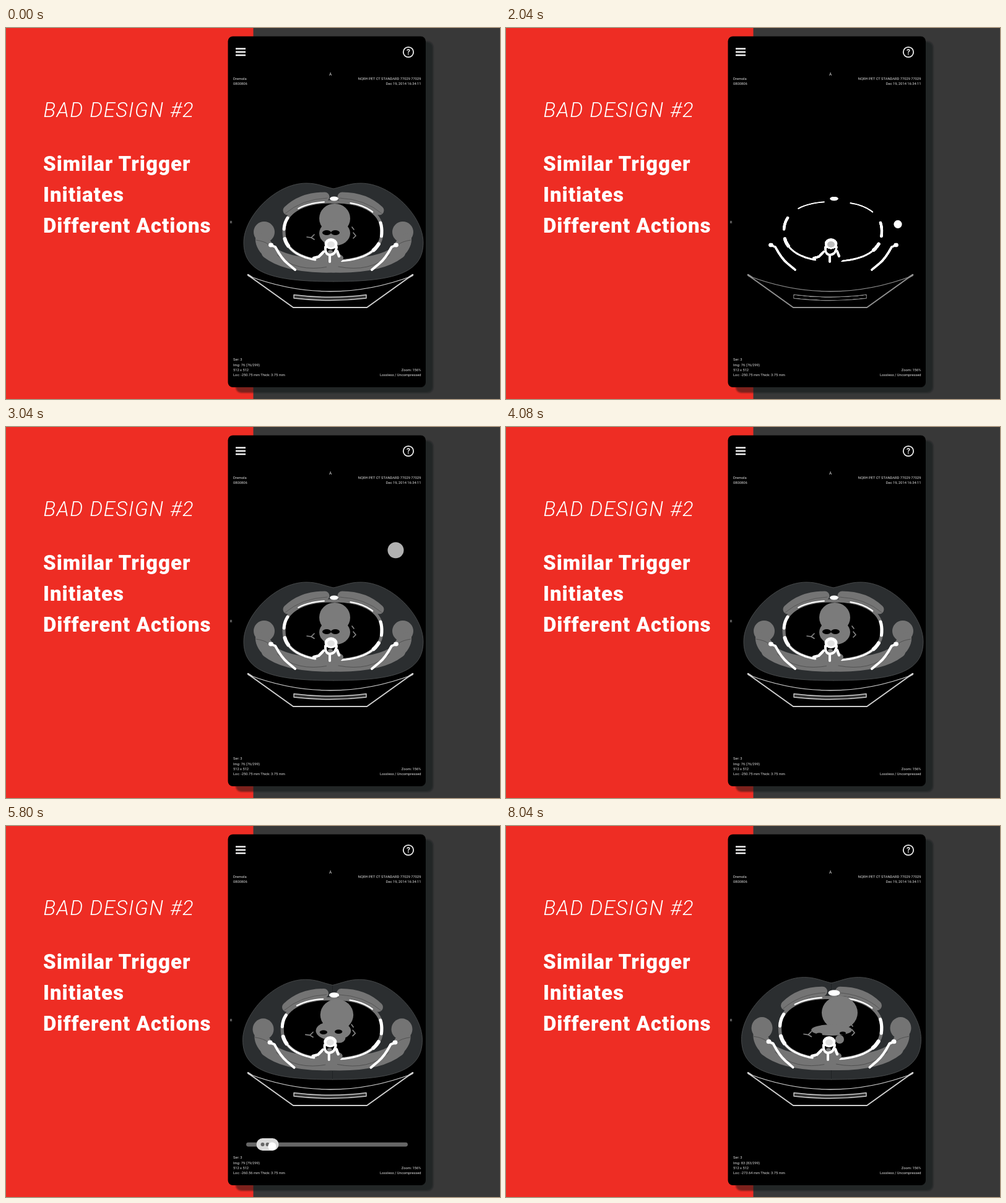
Recreate the animation shown at these times as an HTML page. Size 798 px wide and 600 px high, loop 8.08 s.

```html
<!DOCTYPE html>
<html lang="en">
<head>
<meta charset="utf-8">
<title>Bad design #2</title>
<style>
html, body { margin: 0; width: 100%; height: 100%; overflow: hidden; background: #383838; }
svg { display: block; width: 798px; height: 600px; font-family: Roboto, Arial, sans-serif; }
.title { font-size: 33px; fill: #fff; }
.light { font-weight: 300; font-style: italic; letter-spacing: 1.5px; }
.bold { font-weight: 800; letter-spacing: 1px; }
.info { font-size: 5.75px; fill: #e0e0e0; }
.end { text-anchor: end; }
.line { fill: none; stroke-linecap: round; stroke-linejoin: round; }
</style>
</head>
<body>
<svg viewBox="0 0 798 600" xmlns="http://www.w3.org/2000/svg">
  <defs>
    <filter id="soft" x="-5%" y="-5%" width="110%" height="110%"><feGaussianBlur stdDeviation="1"/></filter>
    <filter id="window" filterUnits="userSpaceOnUse" x="360" y="230" width="318" height="240" color-interpolation-filters="sRGB">
      <feComponentTransfer>
        <feFuncR type="linear"/><feFuncG type="linear"/><feFuncB type="linear"/>
      </feComponentTransfer>
    </filter>
  </defs>

  <rect width="798" height="600" fill="#383838"/>
  <rect width="399.5" height="600" fill="#ee2d24"/>
  <g class="title">
    <text class="light" x="60.6" y="144">BAD DESIGN #2</text>
    <g class="bold">
      <text x="60" y="231">Similar Trigger</text>
      <text x="60" y="281">Initiates</text>
      <text x="60" y="331">Different Actions</text>
    </g>
  </g>

  <rect x="371" y="22" width="319" height="568" rx="9" fill="#0c1218" opacity=".5" filter="url(#soft)"/>
  <rect x="358.5" y="13.5" width="319.5" height="567.5" rx="8"/>
  <path d="M371 33.5h16M371 38.7h16M371 44h16" stroke="#f4f4f4" stroke-width="2.6"/>
  <circle cx="650" cy="39" r="8.2" fill="none" stroke="#ececec" stroke-width="1.8"/>
  <text x="650" y="43.4" text-anchor="middle" font-size="12" font-weight="700" fill="#ececec">?</text>

  <g class="info">
    <text x="367" y="84">Dremola</text>
    <text x="367" y="92">0800806</text>
    <text x="522" y="77.3" font-size="6.5">A</text>
    <text x="362" y="316" font-size="5">R</text>
    <text class="end" x="670.5" y="84">NQRH PET CT STANDARD 77029 77029</text>
    <text class="end" x="670.5" y="92">Dec 19, 2014 16:34:11</text>
    <text x="367" y="538">Ser: 3</text>
    <text x="367" y="546.5" id="image"></text>
    <text x="367" y="554.5">512 x 512</text>
    <text x="367" y="562.5" id="location"></text>
    <text class="end" x="670.5" y="554.5">Zoom: 156%</text>
    <text class="end" x="670.5" y="562.5">Lossless / Uncompressed</text>
  </g>

  <g filter="url(#window)">
    <g id="body"></g>
    <g id="chest"></g>
    <g id="heart"></g>
    <g id="spine"></g>
    <g class="line" stroke="#cfcfcf">
      <path d="M391 400l6 4 67 48h119l67-48 7-4" stroke-width="2"/>
      <path d="M392 401Q524 451 656 401" stroke-width="1.3"/>
      <path d="M391 399l6 4M657 399l-6 4" stroke-width="2.6"/>
      <path d="M465 431.5Q524 439 582 431.5V437Q524 444 465 437Z" stroke-width="1.4" fill="#333"/>
    </g>
  </g>

  <g id="slider">
    <rect x="388" y="511.7" width="261" height="6.8" rx="3.4" fill="#666"/>
    <g id="thumb">
      <rect x="-18" y="505" width="36" height="20" rx="10" fill="#dadada"/>
      <g fill="#666"><circle cx="-8" cy="515" r="3"/><circle cy="515" r="3"/><circle cx="8" cy="515" r="3"/></g>
    </g>
  </g>
  <circle id="touch" fill="#fff"/>
</svg>

<script>
const LOOP = 8080;
const FIRST = 76, LAST = 83, SPACING = 3.27;
const BONE = '#fff', MUSCLE = '#747474', HEART = '#7b7b7b', AIR = '#000';
const AXIS = 529;

const $ = id => document.getElementById(id);
const clamp = v => Math.min(1, Math.max(0, v));
const mix = (a, b, p) => a + (b - a) * p;
const ramp = (t, a, b) => clamp((t - a) / (b - a));
const ease = p => (1 - Math.cos(Math.PI * p)) / 2;

const line = (d, color, width) => `<path class="line" d="${d}" stroke="${color}" stroke-width="${width}"/>`;
const oval = (x, y, rx, ry, color, turn = 0) =>
  `<ellipse rx="${rx}" ry="${ry}" fill="${color}" transform="translate(${x} ${y}) rotate(${turn})"/>`;
const both = half => half + `<g transform="translate(${2 * AXIS}) scale(-1 1)">${half}</g>`;

// Point on the rounded rib cage, angle in degrees clockwise from the right
function cagePoint(angle) {
  const a = angle * Math.PI / 180;
  const bulge = v => Math.sign(v) * Math.abs(v) ** .87;
  return [528 + 79 * bulge(Math.cos(a)), 329 + 48 * bulge(Math.sin(a))].map(v => v.toFixed(1));
}
function cageArc(from, to) {
  const steps = Math.ceil(Math.abs(to - from) / 5);
  return 'M' + Array.from({ length: steps + 1 }, (_, i) => cagePoint(mix(from, to, i / steps))).join('L');
}

const skin = 'M529 260C512 256 503 251 485 251C435 251 384 305 384 347C384 396 430 410 529 410Z';
$('body').innerHTML =
  both(`<path d="${skin}" fill="#2b2e30"/>` + line(skin.replace('Z', ''), '#4b4d4e', .9)) +
  both(
    line('M455 295Q478 273 515 273', MUSCLE, 15) +
    oval(417, 330, 17, 17, MUSCLE) +
    oval(418, 352, 12, 22, MUSCLE, -30) +
    line('M424 362Q455 386 529 384', MUSCLE, 23) +
    line('M404 343Q418 345 424 350M438 367Q470 396 521 386', '#4e4e4e', .9) +
    line('M451 300Q478 277 519 275', '#4e4e4e', .8) +
    line('M427 351L435 354Q445 373 455 381L467 391', BONE, 4) +
    oval(428, 351, 4, 3.4, BONE)
  );

const cage = cageArc(0, 360);
const ribs = [[183, 204, 5], [154, 168, 6], [108, 150, 3.2], [228, 262, 2.2]];
const TILT = 10;
$('chest').innerHTML =
  `<path d="${cage}" fill="${AIR}" stroke="${MUSCLE}" stroke-width="5"/>` +
  line('M486 338l7 1 5 -5M493 339l5 3M559 322l3 4M561 331l4 5 -4 4', '#888', 1.6) +
  ribs.map(([from, to, width]) =>
    line(cageArc(from, to), BONE, width) + line(cageArc(180 - from + TILT, 180 - to + TILT), BONE, width)
  ).join('');

$('spine').innerHTML =
  oval(525, 372, 20, 9, MUSCLE) +
  line('M516 354Q515 366 523 367Q533 366 534 354', BONE, 4) +
  line('M513 362L505 370L497 372M535 361L538 369', BONE, 4.5) +
  line('M523 367V378', BONE, 4) +
  oval(525, 349, 10.5, 9, BONE) + oval(525, 350, 6, 5, '#e2e2e2') +
  oval(524, 361.5, 4, 2.5, '#777');

function set(node, attributes) {
  for (const name in attributes) node.setAttribute(name, attributes[name]);
}

// p runs from the first shown slice (0) to the last (1)
function drawSlice(p) {
  const grow = 1 + .04 * p;
  set($('body'), { transform: `translate(${-3.5 * p} ${-16.4 * p}) scale(1 ${grow})` });
  set($('chest'), { transform: `translate(${-24.5 * p} ${-15 * p}) scale(${grow})` });
  set($('spine'), { transform: `translate(${-3 * p})` });
  const between = (a, b) => mix(a, b, p);
  const airway = (a, b) => oval(between(525 + 7 * a, 525 + 19 * a), between(331, b), between(7, 5), between(4, 2.5), AIR);
  $('heart').innerHTML =
    oval(between(531, 539), between(308, 302), between(25, 29), between(24, 27), HEART) +
    oval(between(531, 526), between(332, 330), between(25, 33), between(20, 9), HEART) +
    oval(between(536, 539), between(342, 345), between(14, 7), between(8, 7), HEART) +
    airway(-1, 337) + airway(1, 335) +
    oval(530, between(276, 270), between(7, 9.5), between(3.5, 4.8), BONE);
}

function drawWindow(level) {
  const slope = 1 / (1 - level);
  document.querySelectorAll('#window feComponentTransfer > *')
    .forEach(node => set(node, { slope, intercept: -level * slope }));
}

// A touch shrinks into place, then swells and fades on release
function drawTouch(t, start, end, x, y) {
  const press = ramp(t, start, start + 160);
  const swell = ramp(t, end, end + 80);
  const fade = ramp(t, end + 80, end + 240);
  set($('touch'), {
    cx: x, cy: y,
    r: mix(13, 6.6, press) + 6.4 * swell,
    opacity: press * mix(1, .7, swell) * (1 - fade)
  });
}

const scrub = t => ramp(t, 4840, 7060);
const sliceAt = t => Math.round(mix(FIRST, LAST, scrub(t)));

function render(t) {
  const pull = ease(ramp(t, 1360, 2040)) - ease(ramp(t, 2120, 2800));
  drawWindow(.56 * pull);

  const shown = sliceAt(t - 80);
  drawSlice((shown - FIRST) / (LAST - FIRST));
  $('image').textContent = `Img: ${shown} (${sliceAt(t)}/299)`;
  $('location').textContent = `Loc: ${(-250.75 - (shown - FIRST) * SPACING).toFixed(2)} mm Thick: 3.75 mm`;

  const fingerX = mix(413.6, 451.1, scrub(t));
  set($('slider'), { opacity: ramp(t, 4440, 4600) - ramp(t, 7400, 7640) });
  set($('thumb'), { transform: `translate(${412.5 + (fingerX - 417) * .78})` });

  if (t < 4000) drawTouch(t, 920, 2960, mix(629.5, 633, pull), mix(199.3, 317.3, pull));
  else drawTouch(t, 4360, 7160, fingerX, 518);
}

const began = performance.now();
function tick() {
  render((performance.now() - began) % LOOP);
  requestAnimationFrame(tick);
}
tick();
</script>
</body>
</html>
```
